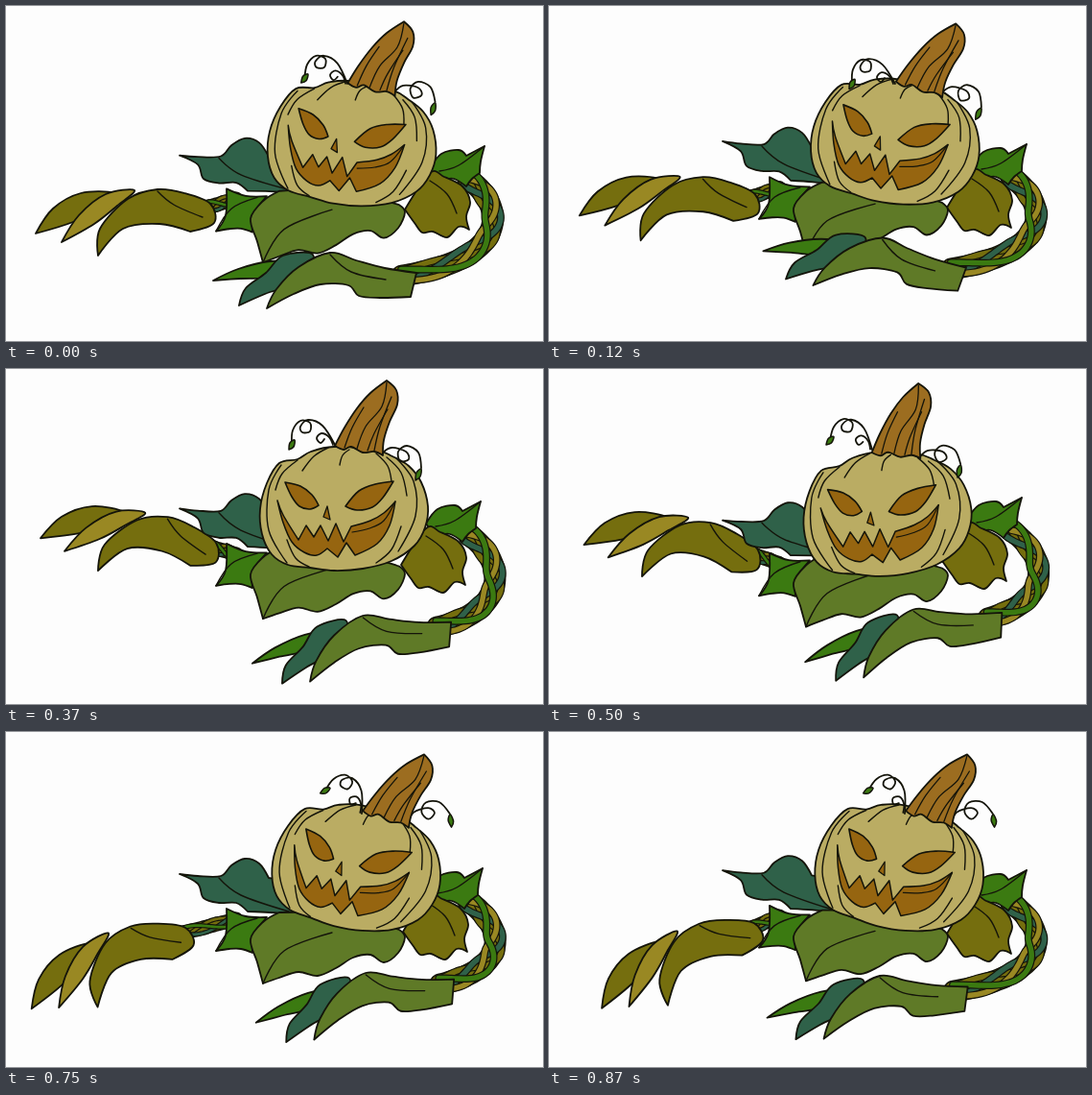
These frames come from a looping animation (560x349 px, 1000 ms). An HTML page with a canvas:

```html
<!DOCTYPE html>
<html lang="en">
<head>
<meta charset="utf-8">
<title>Pumpkin creature</title>
<style>
html, body { margin: 0; width: 100%; height: 100%; overflow: hidden; background: #fdfdfd; }
canvas { display: block; width: 560px; height: 349px; }
</style>
</head>
<body>
<canvas id="stage" width="560" height="349"></canvas>
<script>
const ctx = document.getElementById('stage').getContext('2d');
const INK = '#14140a';
const COLOR = {
  skin: '#baac63', glow: '#966510', rim: '#ac8a38', stem: '#9c6d20', teal: '#2f6149',
  green: '#3b7a11', olive: '#756e0e', yellow: '#998823', moss: '#5f7a27'
};

// Outlines: "x,y" key points joined by a smooth curve; "!" marks a sharp corner.
const BODY = '318,86 304,94 285,98 272,119 265,146 267,172 277,193 294,204 317,207 342,210 372,208 402,200 426,184 437,165 440,143 433,118 420,101 403,91 385,84 342,81';
const RIDGES = [
  '287,100 274,126 274,168 293,202', '304,95 288,109 281,126', '336,82 321,91 309,106',
  '358,84 351,90 348,100', '386,88 398,101 402,117', '397,92 412,108 418,132',
  '407,93 425,117 427,153 409,190', '293,178 302,197 316,206', '412,164 402,188 386,202'
];
const EYES = [
  '291,118! 307,122 319,131 326,142! 317,146 306,143 298,133',
  '404,117! 385,120 368,127 354,143! 366,147 382,144 393,134'
];
const NOSE = '335,143! 331,154! 338,157!';
const MOUTH = '283,137! 289,152 305,178! 313,163! 321,175! 328,163! 336,179! 344,161! 352,180! 360,164! 380,158 394,150 406,138! 400,163 387,182 364,194! 355,181! 346,196! 335,187! 324,194 311,191 298,180 289,160';
const SMILE = '406,138 394,158 379,166 361,170';
const STEM = '29,-73! 12,-60 -2,-44 -15,-24 -25,-5! -16,-1 -8,-4 4,2 16,1 25,5! 26,-11 32,-30 40,-48 39,-63';
const GRAIN = ['29,-71 24,-46 7,-25 -2,-2', '34,-56 22,-25 16,0', '5,-45 -7,-24 -15,-3', '30,-43 16,-18 9,0'];
const CURLS = [
  { x: -25, y: -6, lift: 1, paths: ['0,0 -13,-20 -28,-26 -36,-19 -34,-13 -26,-14 -26,-23 -36,-25 -44,-15 -45,-1', '-2,0 -6,-8 -14,-12 -19,-7 -15,-2 -11,-6'], tip: '-48,5! -43,2 -42,-5 -47,-2' },
  { x: 24, y: 3, lift: -1, paths: ['0,0 10,-6 25,-2 28,6 19,8 17,-2 26,-8 38,-1 41,15'], tip: '35,28! 40,24 41,16 36,20' }
];
const LEAVES = {
  teal: ['181,148! 200,150 224,150 235,139 249,132 264,137 274,152! 295,160 300,190! 275,188 252,187! 240,178 222,178 206,173 200,158',
    '222,152 245,170 295,187', COLOR.teal],
  small: ['219,228! 229,212 230,184! 250,192 272,193! 262,205 257,216 257,230! 245,226 233,226',
    '219,228 235,205 262,194', COLOR.green],
  main: ['268,262! 262,240 255,216 268,198 285,188! 350,190 410,206! 416,214 409,230 394,240 380,232 362,235 344,246 325,254 305,250 285,256',
    '268,262 290,228 340,209', COLOR.moss],
  olive: ['414,208! 440,170 455,174 474,184 482,200 478,215 481,229! 470,226 458,237 443,231 432,232 424,222',
    '440,178 458,192 468,212', COLOR.olive],
  right: ['440,165! 452,150 470,146 478,152! 497,142! 493,158 492,170! 484,176 478,184! 465,176 450,176',
    '450,168 470,162 497,142', COLOR.green]
};
// Hands are drawn around the knuckle; claws and palm turn separately.
const LEFT_HAND = {
  claws: [
    ['-104,44! -86,18 -57,2 -23,2 -30,15 -65,32', COLOR.olive],
    ['-77,53! -59,25 -31,3 -1,-1 -19,15 -43,34', COLOR.yellow]],
  finger: '-13,39 -39,67! -37,39 -8,8',
  palm: '23,-2 51,2 78,13 82,33 57,42! 25,34',
  crease: '23,0 40,14 70,27',
  color: COLOR.olive
};
const RIGHT_HAND = {
  claws: [
    ['-122,29! -96,17 -63,9 -28,10 -58,25 -93,27', COLOR.green],
    ['-95,55! -88,37 -67,21 -49,3 -18,2 -29,28 -68,43', COLOR.teal]],
  finger: '-10,33 -38,43 -66,58! -56,38 -33,15',
  palm: '0,0 27,8 57,16 90,21! 84,46! 52,47 30,45 19,34',
  crease: '0,2 22,20 58,28',
  color: COLOR.moss
};

// head, stem: x, y, angle; hands: knuckle x, y, palm angle, claw angle.
// bob and tilt lift the left and right leaves, curl lifts the tendrils.
const crouch = {
  step: 6, head: [366, 142, 13], stem: [396, 91, 9], curl: 32, bob: 0, tilt: 0,
  left: [108, 210, -14, -21], right: [375, 251, -9, -11]
};
const KEYS = [
  { step: 0, head: [361, 144, 9], stem: [381, 87, 4], curl: 7, bob: 6, tilt: 4,
    left: [135, 193, 0, 0], right: [338, 257, 0, 0] },
  { step: 2, head: [362, 140, 13], stem: [391, 87, 11], curl: -8, bob: -17, tilt: 0,
    left: [140, 165, 6, 5], right: [358, 226, 13, 14] },
  { step: 3, head: [352, 146, 0], stem: [368, 85, 0], curl: 0, bob: -2, tilt: -4,
    left: [146, 151, 13, 10], right: [372, 257, -9, -10] },
  { step: 5, head: [353, 157, -4], stem: [356, 95, -9], curl: 24, bob: 17, tilt: -12,
    left: [146, 161, 17, 8], right: [388, 244, -13, -15] },
  crouch,
  { ...crouch, step: 7, bob: -3, tilt: 2, left: [135, 208, -16, -22], right: [345, 254, -6, -7] }
];

const parse = text => text.split(' ').map(token => {
  const [x, y] = token.split(',').map(parseFloat);
  return [x, y, token.endsWith('!')];
});
const place = (text, move) => parse(text).map(p => [...move(p), p[2]]);
const mix = (a, b, k) => Array.isArray(a) ? a.map((v, i) => mix(v, b[i], k)) : a + (b - a) * k;

function turn([cx, cy, degrees], ox = 0, oy = 0) {
  const angle = degrees * Math.PI / 180, cos = Math.cos(angle), sin = Math.sin(angle);
  return ([x, y]) => [cx + (x - ox) * cos - (y - oy) * sin, cy + (x - ox) * sin + (y - oy) * cos];
}

function trace(points, closed) {
  const n = points.length;
  const tangent = (i, axis) => {
    if (points[i][2] || (!closed && (i === 0 || i === n - 1))) return 0;
    return (points[(i + 1) % n][axis] - points[(i + n - 1) % n][axis]) / 6;
  };
  ctx.beginPath();
  ctx.moveTo(points[0][0], points[0][1]);
  for (let i = 0; i < (closed ? n : n - 1); i++) {
    const j = (i + 1) % n, a = points[i], b = points[j];
    ctx.bezierCurveTo(a[0] + tangent(i, 0), a[1] + tangent(i, 1),
      b[0] - tangent(j, 0), b[1] - tangent(j, 1), b[0], b[1]);
  }
  if (closed) ctx.closePath();
}
function stroke(width, color = INK) {
  ctx.strokeStyle = color;
  ctx.lineWidth = width;
  ctx.stroke();
}
function fill(points, color, width = 1.8) {
  trace(points, true);
  ctx.fillStyle = color;
  ctx.fill();
  stroke(width);
}
function line(points, width = 1.4) {
  trace(points, false);
  stroke(width);
}

// Twisted strands swinging from side to side along a cubic curve.
function braid(curve, width, turns, colors) {
  const at = t => [0, 1].map(c => {
    const u = 1 - t, [a, b, d, e] = curve.map(p => p[c]);
    return u * u * u * a + 3 * u * u * t * b + 3 * u * t * t * d + t * t * t * e;
  });
  const strand = (spread, phase) => Array.from({ length: 31 }, (_, i) => {
    const t = i / 30, [x, y] = at(t), [x0, y0] = at(t - .01), [x1, y1] = at(t + .01);
    const k = spread * Math.sin(2 * Math.PI * (turns * t + phase)) / Math.hypot(x1 - x0, y1 - y0);
    return [x - (y1 - y0) * k, y + (x1 - x0) * k];
  });
  trace(strand(0, 0), false);
  stroke(width);
  stroke(width - 3, colors[0]);
  colors.forEach((color, i) => {
    trace(strand(width * .36, i / colors.length), false);
    stroke(width * .34);
    stroke(width * .34 - 2.4, color);
  });
}

function leaf(name, move) {
  const [outline, vein, color] = LEAVES[name];
  fill(place(outline, move), color);
  line(place(vein, move));
}

function hand({ claws, finger, palm, crease, color }, [x, y, palmAngle, clawAngle]) {
  const clawMove = turn([x, y, clawAngle]), palmMove = turn([x, y, palmAngle]);
  claws.forEach(([outline, shade]) => fill(place(outline, clawMove), shade));
  fill([...place(finger, clawMove), ...place(palm, palmMove)], color);
  line(place(crease, palmMove));
}

function head(move) {
  fill(place(BODY, move), COLOR.skin);
  RIDGES.forEach(ridge => line(place(ridge, move)));
  EYES.forEach(eye => fill(place(eye, move), COLOR.glow, 1.6));
  fill(place(NOSE, move), COLOR.glow, 1.3);
  fill(place(MOUTH, move), COLOR.glow, 1.5);
  line(place(SMILE, move), 1.2);
}

function draw({ head: skull, stem, curl, bob, tilt, left, right }) {
  // Left leaves swing most at their outer tips.
  const swing = ([x, y]) => [x, y + bob * (1.2 - (x - 200) / 210)];
  const shift = ([x, y]) => [x + tilt / 2, y + tilt];

  ctx.fillStyle = '#fdfdfd';
  ctx.fillRect(0, 0, 560, 349);
  ctx.lineCap = ctx.lineJoin = 'round';

  const wrist = turn(right)([75, 24]);
  braid([[482, 176 + tilt], [526, 208 + tilt], [520, wrist[1] - 16], wrist],
    23, 1.4, [COLOR.olive, COLOR.teal, COLOR.yellow, COLOR.green]);
  leaf('right', shift);
  leaf('olive', shift);

  const shoulder = swing([240, 195]), palmEnd = turn(left)([70, 18]);
  braid([shoulder, mix(shoulder, palmEnd, .3), mix(shoulder, palmEnd, .7), palmEnd],
    15, .7, [COLOR.olive, COLOR.teal, COLOR.green]);
  hand(LEFT_HAND, left);
  ['teal', 'small', 'main'].forEach(name => leaf(name, swing));

  head(turn(skull, 352, 146));

  for (const { x, y, lift, paths, tip } of CURLS) {
    const move = turn([stem[0] + x, stem[1] + y, lift * curl]);
    paths.forEach(path => line(place(path, move), 1.8));
    fill(place(tip, move), COLOR.green, 1.5);
  }
  const stemMove = turn(stem);
  fill(place(STEM, stemMove), COLOR.stem);
  GRAIN.forEach(grain => line(place(grain, stemMove), 1.3));

  hand(RIGHT_HAND, right);
}

// Steps without a key pose fall between their neighbours.
function poseAt(step) {
  const before = KEYS.filter(key => key.step <= step).pop();
  const after = KEYS.find(key => key.step >= step);
  const k = before === after ? 0 : (step - before.step) / (after.step - before.step);
  return Object.fromEntries(Object.keys(before).map(name => [name, mix(before[name], after[name], k)]));
}

// Eight steps a second, each starting on a whole hundredth.
const stepStart = step => Math.floor(step * 12.5) * 10;
const begin = performance.now();
function tick() {
  const time = (performance.now() - begin) % 1000;
  let step = 7;
  while (stepStart(step) > time) step--;
  draw(poseAt(step));
  requestAnimationFrame(tick);
}
tick();
</script>
</body>
</html>
```
